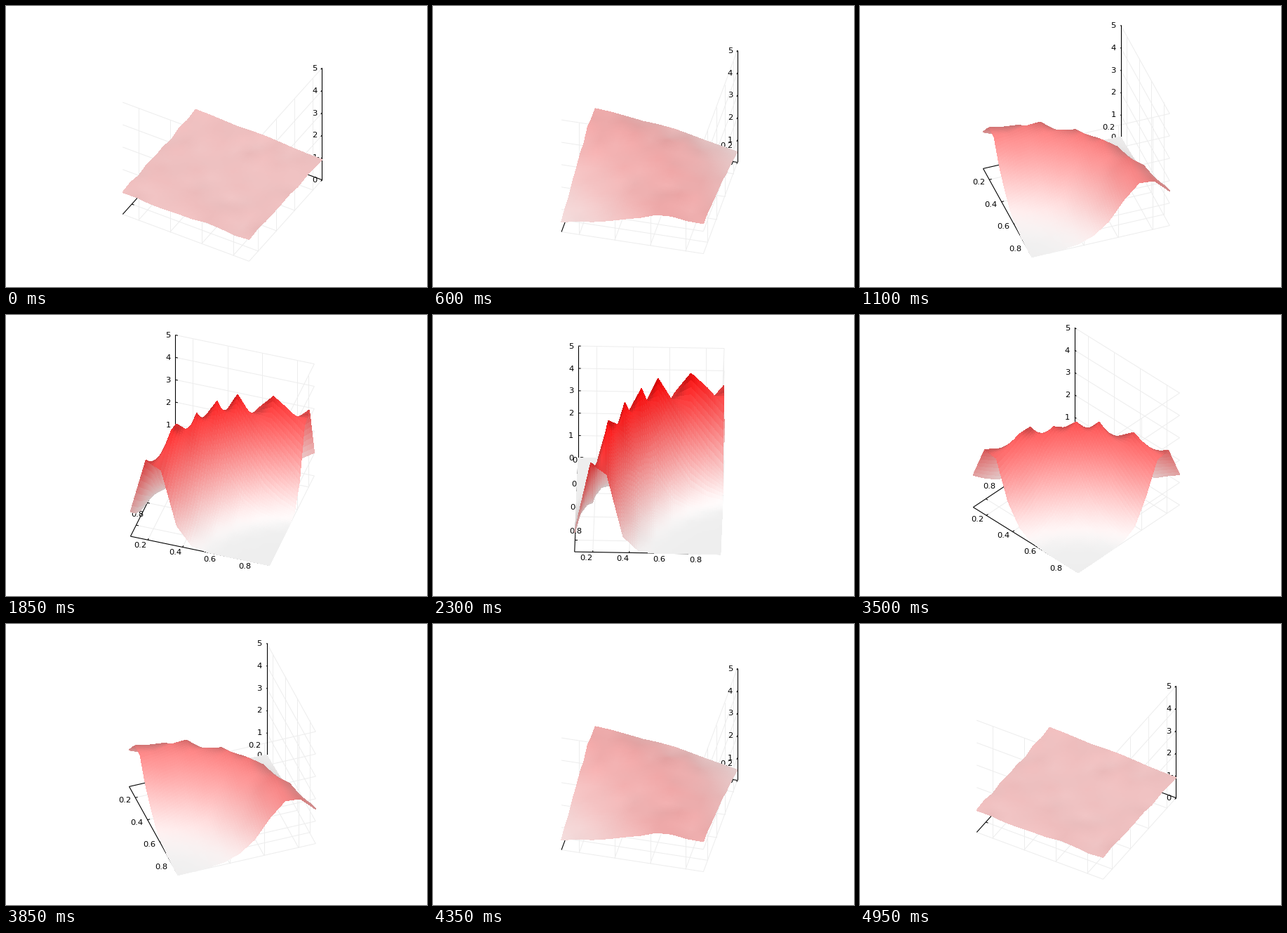
These frames come from a looping animation (600 by 400 pixels, 5000 ms). A matplotlib script:

```python
import numpy as np
import matplotlib.pyplot as plt
from matplotlib.animation import FuncAnimation
from matplotlib.collections import LineCollection, PolyCollection

W, H, FRAMES, INTERVAL = 600, 400, 100, 50
PX = 0.72                      # points per pixel at 100 dpi
SIDE, ELEV = 208, np.radians(40)
SIN_E, COS_E = np.sin(ELEV), np.cos(ELEV)
CENTER = (308.4, 272)
N, SUB = 10, 8
TICKS = (0.2, 0.4, 0.6, 0.8)
TICK = 0.0175

A, B = np.mgrid[0:N, 0:N]
NOISE = 1 + np.random.default_rng(4).uniform(-0.08, 0.08, (N, N))
ARCH = np.sin(np.pi * (A + B) / (2 * (N - 1)))
FROM_RIDGE = B - A - (2 - 3.2 * ARCH)     # signed distance from the bowed ridge


def swing(step):
    return np.cos(2 * np.pi * step / (FRAMES - 1))


def heights(step):
    """Noisy plane that narrows and rises into a ridge, then falls back."""
    w = (1 - swing(step)) / 2
    top = 0.97 + 3.5 * w + 0.5 * w ** 4
    ends = 1 - 0.15 * w * (1 - ARCH)
    width = np.where(FROM_RIDGE > 0, 1.37, 1.1)
    ridge = np.exp(-0.5 * (FROM_RIDGE * w ** 0.8 / width) ** 2)
    return np.clip(top * ends * ridge * NOISE, 0, 5)


def spread(points):
    """Matrix of linear interpolation from the coarse grid to points."""
    return np.array([np.interp(points, np.arange(N), row) for row in np.eye(N)]).T


fine = np.linspace(0, N - 1, (N - 1) * SUB + 1)
mid = (fine[1:] + fine[:-1]) / 2
NODES, CELLS = spread(fine), spread(mid)
FA, FB = np.meshgrid(fine / (N - 1), fine / (N - 1), indexing="ij")
CA, CB = np.meshgrid(mid / (N - 1), mid / (N - 1), indexing="ij")


def project(a, b, z, phi):
    c, s = np.cos(phi), np.sin(phi)
    x = CENTER[0] + SIDE * ((b - .5) * c + (a - .5) * s)
    y = CENTER[1] + SIDE * (SIN_E * ((b - .5) * s - (a - .5) * c) - COS_E * z / 5)
    return np.stack([x, y], axis=-1)


def surface(step, phi):
    z = heights(step)
    p = project(FA, FB, NODES @ z @ NODES.T, phi)
    quads = np.stack([p[:-1, :-1], p[1:, :-1], p[1:, 1:], p[:-1, 1:]], axis=2)

    ga, gb = (CELLS @ g @ CELLS.T for g in np.gradient(z / 5, 1 / (N - 1)))
    c, s = np.cos(phi), np.sin(phi)
    facing = (ga * c * COS_E - gb * s * COS_E + SIN_E) / np.sqrt(1 + ga ** 2 + gb ** 2)
    shade = np.clip(0.8 + 0.21 * np.abs(facing), 0, 1)
    pale = 1 - CELLS @ z @ CELLS.T / 5
    rgb = np.stack([shade, shade * pale, shade * pale], axis=-1)

    order = np.argsort((CB * s - CA * c).ravel(), kind="stable")
    return quads.reshape(-1, 4, 2)[order], rgb.reshape(-1, 3)[order]


def frac(value):
    return (value - 0.1) / 0.8


def segments(lines, phi):
    return [[project(*p, phi), project(*q, phi)] for p, q in lines]


GRID, MARKS = [], []
AXES = [((0, 0, 0), (0, 1, 0)), ((0, 0, 0), (1, 0, 0)), ((1, 0, 0), (1, 0, 5))]
for v in TICKS:
    t = frac(v)
    GRID += [((0, t, 0), (1, t, 0)), ((t, 0, 0), (t, 1, 0)),
             ((1, t, 0), (1, t, 5)), ((t, 1, 0), (t, 1, 5))]
    MARKS += [((0, t, 0), (TICK, t, 0)), ((t, 0, 0), (t, TICK, 0))]
for v in range(6):
    GRID += [((1, 0, v), (1, 1, v)), ((0, 1, v), (1, 1, v))]
    MARKS.append(((1, 0, v), (1, TICK, v)))

fig = plt.figure(figsize=(W / 100, H / 100), dpi=100, facecolor="white")
ax = fig.add_axes([0, 0, 1, 1])
ax.set_xlim(0, W)
ax.set_ylim(H, 0)
ax.axis("off")

grid = ax.add_collection(LineCollection([], colors="#ededed", linewidths=PX, zorder=1))
axes = ax.add_collection(LineCollection([], colors="black", linewidths=1.1 * PX, zorder=2))
marks = ax.add_collection(LineCollection([], colors="black", linewidths=PX, zorder=2))
sheet = ax.add_collection(PolyCollection([], linewidths=0.4 * PX, antialiaseds=False, zorder=4))


def label(text, ha):
    return ax.text(0, 0, text, ha=ha, va="center", fontsize=11.5 * PX,
                   family="DejaVu Sans", color="black", zorder=3)


x_labels = [label(str(v), "center") for v in TICKS]
y_labels = [label(str(v), "center") for v in TICKS]
z_labels = [label(str(v), "right") for v in range(6)]


def label_offsets(deg):
    y_off = (0.8 + 0.085 * deg, -12.7 - 7 * np.sin(np.radians(deg)))
    if deg > 90:               # the labels switch to the inner side
        return (14, -14), y_off
    return (-9 - 0.085 * deg, 8.6 - 0.064 * deg), y_off


def draw(step):
    deg = 60 + 60 * swing(step)
    phi = np.radians(deg)
    grid.set_segments(segments(GRID, phi))
    axes.set_segments(segments(AXES, phi))
    marks.set_segments(segments(MARKS, phi))

    x_off, y_off = label_offsets(deg)
    for v, xl, yl in zip(TICKS, x_labels, y_labels):
        xl.set_position(project(0, frac(v), 0, phi) + x_off)
        yl.set_position(project(1 - frac(v), 0, 0, phi) + y_off)
    for v, zl in enumerate(z_labels):
        zl.set_position(project(1, 0, v, phi) + (-6.7, 0.6))

    quads, colors = surface(step, phi)
    sheet.set_verts(quads)
    sheet.set_facecolor(colors)
    sheet.set_edgecolor(colors)
    return [grid, axes, marks, sheet, *x_labels, *y_labels, *z_labels]


anim = FuncAnimation(fig, draw, frames=FRAMES, interval=INTERVAL,
                     init_func=lambda: draw(0), repeat=True, repeat_delay=0)
plt.show()
```
